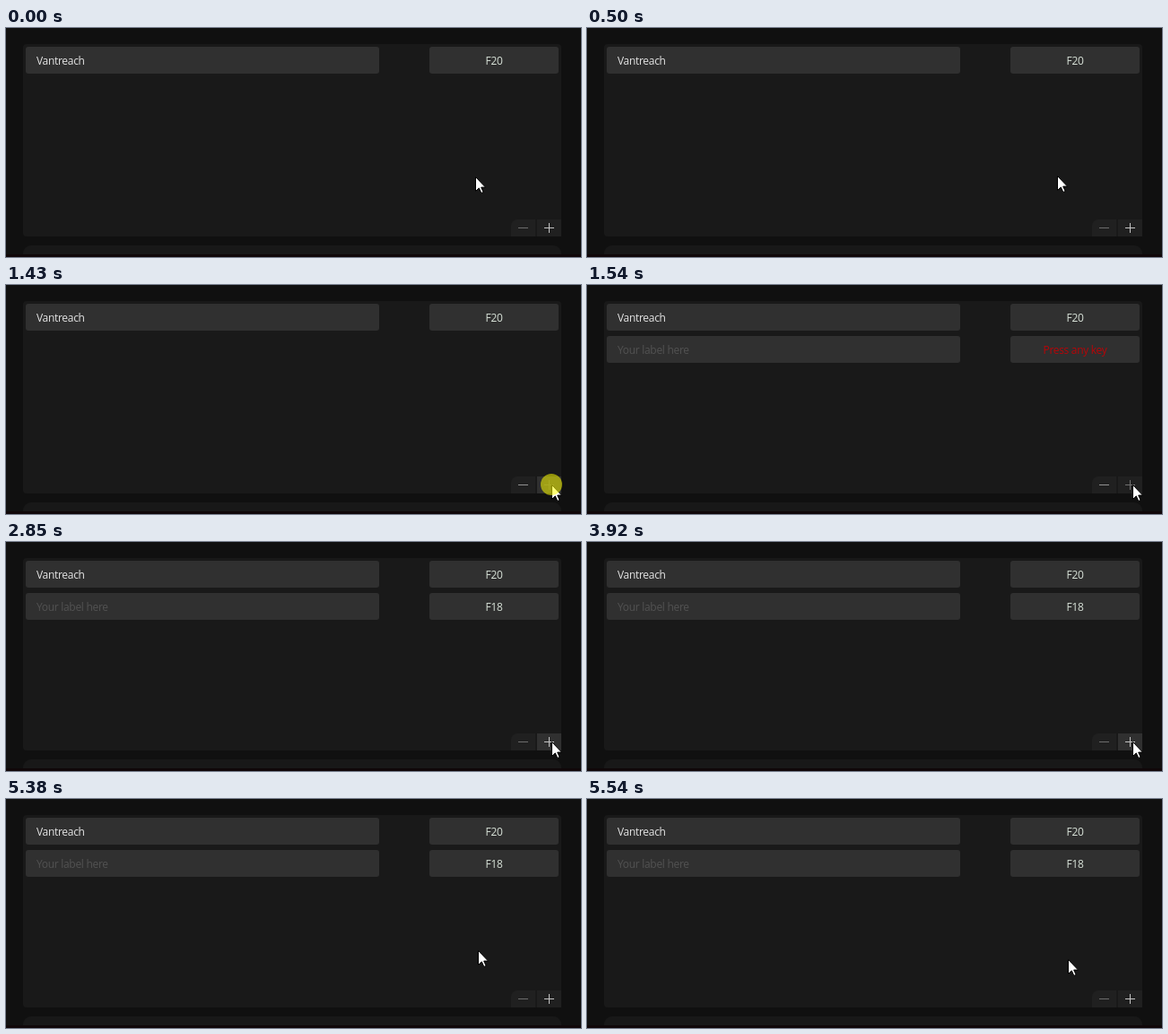
Write an HTML page that moves like this. It is 641 px wide and 256 px high and loops after 5.57 s.

```html
<!DOCTYPE html>
<html lang="en">
<head>
<meta charset="utf-8">
<style>
  html, body { margin: 0; width: 100%; height: 100%; overflow: hidden; background: #101010; }
  svg { display: block; font: 12px "Open Sans", "Noto Sans", sans-serif; letter-spacing: -.3px; }
  .field { fill: #303030; }
  .button { fill: #202020; }
  .label { fill: #e4e4e4; }
  .key { text-anchor: middle; fill: #d8e2d8; }
  .hint { fill: #525252; }
</style>
</head>
<body>
<svg width="641" height="256" viewBox="0 0 641 256">
  <rect x="19" y="18" width="600" height="215" rx="4" fill="#191919"/>
  <rect x="19" y="243" width="600" height="30" rx="9" fill="#181818"/>
  <rect y="253" width="641" height="3" fill="#100709"/>

  <g id="fields">
    <rect class="field" x="22" y="21" width="394" height="30" rx="3"/>
    <rect class="field" x="472" y="21" width="144" height="30" rx="3"/>
  </g>
  <text class="label" x="34" y="41">Vantreach</text>
  <text class="key" x="544" y="41">F20</text>

  <g id="newRow">
    <use href="#fields" y="36"/>
    <text class="hint" x="34" y="77">Your label here</text>
    <text class="key" id="newKey" x="544" y="77"></text>
  </g>

  <path class="button" d="M563 233V221a7 7 0 0 1 7-7H590V233Z"/>
  <rect class="button" id="addButton" x="592" y="214" width="27" height="19"/>
  <path id="minus" d="M571 223.5h11"/>
  <path id="plus" d="M600 223.5h11M605.5 218v11"/>

  <path id="cursor" d="M.5.5V16.5L4.3 12.9 6.8 18.5 9.2 17.5 6.7 12.1H11.5Z" fill="#fff" stroke="#000"/>
  <circle id="click" cx="608" cy="223" r="12" fill="#ff0" fill-opacity=".54"/>
</svg>
<script>
const LOOP = 5570, TICK = 33.35;
const PRESS = 1430, ADDED = 1540, KEY_SET = 2850;

const el = id => document.getElementById(id);
const show = (id, on) => el(id).setAttribute("visibility", on ? "visible" : "hidden");
const ramp = (t, from, to) => Math.min(1, Math.max(0, (t - from) / (to - from)));
const smooth = p => p * p * (3 - 2 * p);

// The cursor settles, speeds up towards the button, leaves it, then drifts.
function cursorAt(t) {
  const settle = (1 - ramp(t, 0, 230)) ** 6;
  const approach = ramp(t, 400, 990);
  const leave = smooth(ramp(t, 3890, 4235));
  const drift = ramp(t, 5350, 5536);
  return [
    520 + 3 * settle + 88 * approach ** 1.8 - 83 * leave + 11 * drift,
    164 + 2 * settle + 59 * approach ** 2.15 - 55 * leave + 11 * drift
  ].map(Math.round);
}

function draw(now) {
  const t = now % LOOP;
  const [x, y] = cursorAt(Math.floor((t + 5) / TICK) * TICK);
  const pressed = t >= PRESS && t < ADDED;
  const waiting = t >= ADDED && t < KEY_SET;
  const hover = t >= PRESS && x >= 592 && !waiting;

  el("cursor").setAttribute("transform", `translate(${x} ${y})`);
  show("click", pressed);
  show("newRow", t >= ADDED);
  el("newKey").textContent = waiting ? "Press any key" : "F18";
  el("newKey").style.fill = waiting ? "#b80508" : "";
  el("addButton").style.fill = hover ? "#303030" : "";
  el("minus").style.stroke = pressed || waiting ? "#929292" : "#6c6c6c";
  el("plus").style.stroke = pressed ? "#484848" : waiting ? "#707070" : "#c4c4c4";
  requestAnimationFrame(() => draw(performance.now()));
}
draw(0);
</script>
</body>
</html>
```
